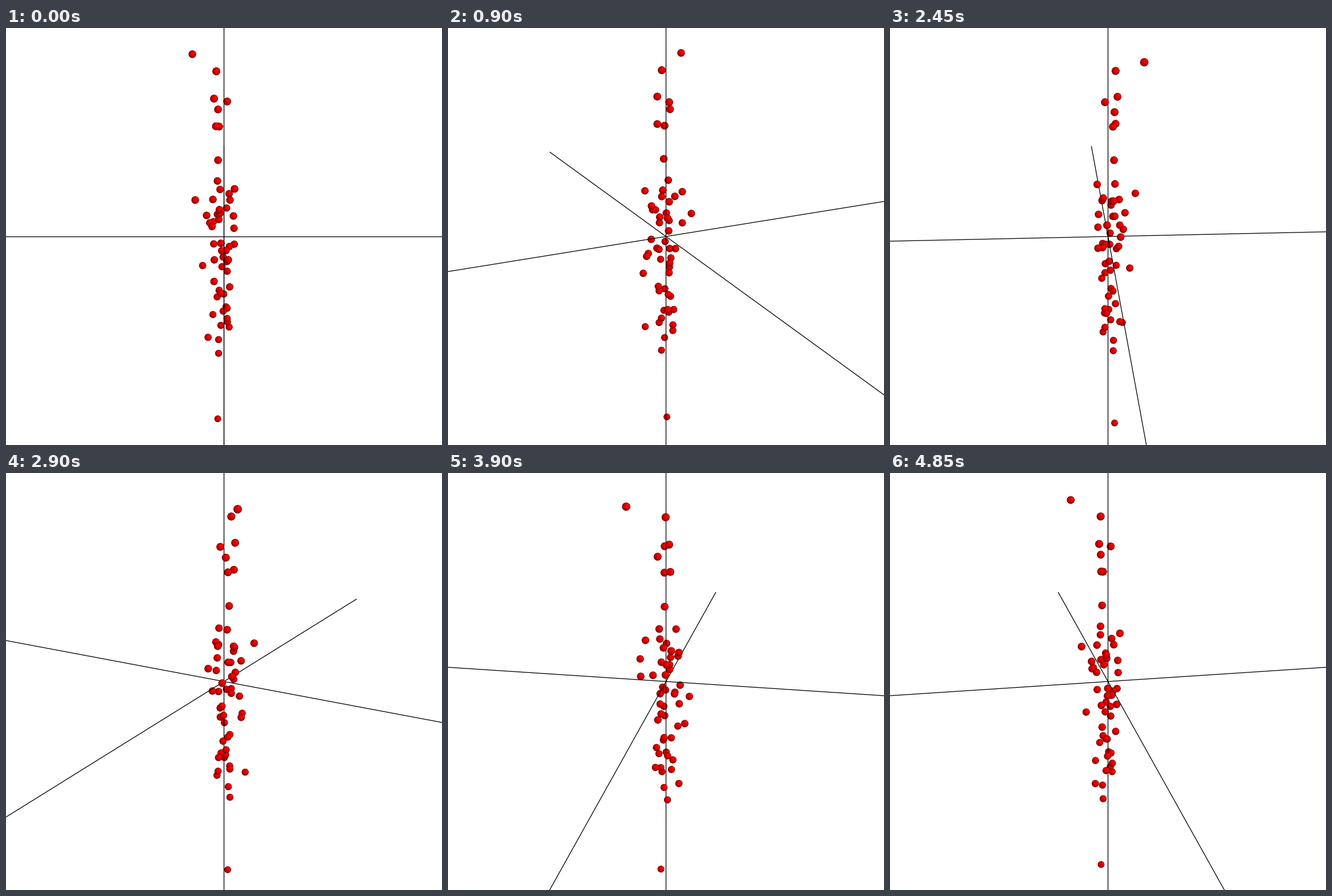
Animation, 765 px wide and 732 px high, one loop 4900 ms. Source, as a matplotlib script:

```python
import numpy as np
import matplotlib.pyplot as plt
from matplotlib.animation import FuncAnimation

W, H = 765, 732
FRAMES, INTERVAL = 98, 50
STEP = np.radians(3.6)
TILT = np.radians(20)
SIN, COS = np.sin(TILT), np.cos(TILT)
DIST = H / 2 / np.tan(np.radians(15))   # 30 degree field of view
AXIS = DIST / 2
RADIUS = 6.5
LINE = dict(color="black", lw=1.3, solid_capstyle="butt")

# Scatter data: offsets from the centre in the front view, and depth, in pixels
front_x = np.array([
    -55.5, -13.5, -17.5, 5.5, -10.5, -14.2, -8.5, -10.5, -11.5, -7, 18.5, 9,
    -50.5, -19.5, 10.5, 4.5, -8, -30.5, -11.5, -7, 16.5, -9, -25, -18.5,
    -21, 17.5, -18, -5.5, 18, 9.5, -4, 3.5, -1.5, -17, 7.5, 5, -37.5, -3.5,
    5.5, -17.5, 10, -8.5, -6, -0.5, -12, 3.5, 5.5, -1.5, -19.5, 5.5, 6,
    -5.5, 9, -28, -9.5, -9.5, -11])
front_y = np.array([
    320, 290, 242, 237, 223, 193.5, 193, 134, 97.5, 82.5, 83.5, 75,
    64, 65, 64, 50, 47, 37, 39, 41, 36, 30, 24, 26,
    17.5, 14.5, -13, -12, -13.5, -17.5, -25, -24.5, -36, -41, -41, -44, -51, -53,
    -61, -79, -88.5, -94.5, -100, -101, -106, -123.5, -126, -131, -137, -144, -150,
    -156, -159, -177, -181, -205, -320])
depth = np.array([
    -55.7, 1.9, 8.9, -3.5, -12.7, 10.4, -1.2, -0.5, -9.8, -34.5, 14.8, -12.7,
    18.7, -0.8, -1.1, -46, 24.8, 6.5, -6, 23, 5, 8.1, -17.9, -40.1,
    3, 3.3, -6.8, 26.5, -9.5, -2.6, 15.9, 15.4, -10.1, 27, 41.5, -4.8, -7, -8.2,
    -3.4, 37.1, 19.6, -1.8, 10.6, -4.6, -14.5, -13.2, -0.7, 3.2, -14.7, 11.4, -10.4,
    10.8, -8.9, 28.3, -1.7, 4.4, -6.9])


def unproject(u, v, d):
    """World position of points seen at (u, v) in the front view."""
    scale = 1 / (1 + (v * SIN / COS + d / COS) / DIST)
    return scale * np.array([u, (v + d * SIN) / COS, d])


def spin(x, z, angle):
    c, s = np.cos(angle), np.sin(angle)
    return x * c - z * s, z * c + x * s


def project(x, y, z):
    """Screen position and magnification of points in camera-facing space."""
    zoom = 1 / (1 - (z * COS + y * SIN) / DIST)
    return x * zoom, (y * COS - z * SIN) * zoom, zoom


PX, PY, PZ = unproject(front_x, front_y, depth)

# Each ball is a stack of discs shrinking towards the light
level = np.linspace(0, 1, 8)
disc_size = 1 - 0.65 * level
disc_shift = np.outer(1 - disc_size, [0.62, 0.45])
disc_color = np.zeros((len(level), 3))
disc_color[:, 0] = 0.42 + 0.56 * np.sqrt(level)

fig = plt.figure(figsize=(W / 72, H / 72), dpi=72, facecolor="white")
ax = fig.add_axes([0, 0, 1, 1])
ax.set_xlim(-W / 2, W / 2)
ax.set_ylim(-H / 2, H / 2)
ax.axis("off")

# Layers from back to front: below the floor, the floor axes, above the floor
ball_layers = {}
for above in (False, True):
    base = 10 * above
    for near in (False, True):
        ball_layers[above, near] = ax.scatter([], [], linewidths=0, zorder=base + 1 + 2 * near)
    pole_end = H if above else -H
    ax.plot([0, 0], [0, pole_end], snap=False, zorder=base + 2, **LINE)
floor_lines = [ax.plot([], [], zorder=5, **LINE)[0] for _ in range(2)]


def set_balls(layer, x, y, r):
    centers = np.column_stack([x, y])[:, None, :] + r[:, None, None] * disc_shift
    layer.set_offsets(centers.reshape(-1, 2))
    layer.set_sizes((2 * np.outer(r, disc_size).ravel()) ** 2)
    layer.set_facecolors(np.tile(disc_color, (len(r), 1)))


def update(frame):
    angle = frame * STEP
    ends = np.array([-AXIS, AXIS])
    for line, (ex, ez) in zip(floor_lines, [(ends, 0 * ends), (0 * ends, ends)]):
        x, z = spin(ex, ez, angle)
        line.set_data(*project(x, 0, z)[:2])

    x, z = spin(PX, PZ, angle)
    u, v, zoom = project(x, PY, z)
    order = np.argsort(zoom)
    for (above, near), layer in ball_layers.items():
        keep = ((PY > 0) == above) & ((z > -RADIUS / 2) == near)
        pick = order[keep[order]]
        set_balls(layer, u[pick], v[pick], RADIUS * zoom[pick])
    return [*ball_layers.values(), *floor_lines]


anim = FuncAnimation(fig, update, frames=FRAMES, interval=INTERVAL,
                     repeat=True, repeat_delay=0, blit=False)
plt.show()
```
